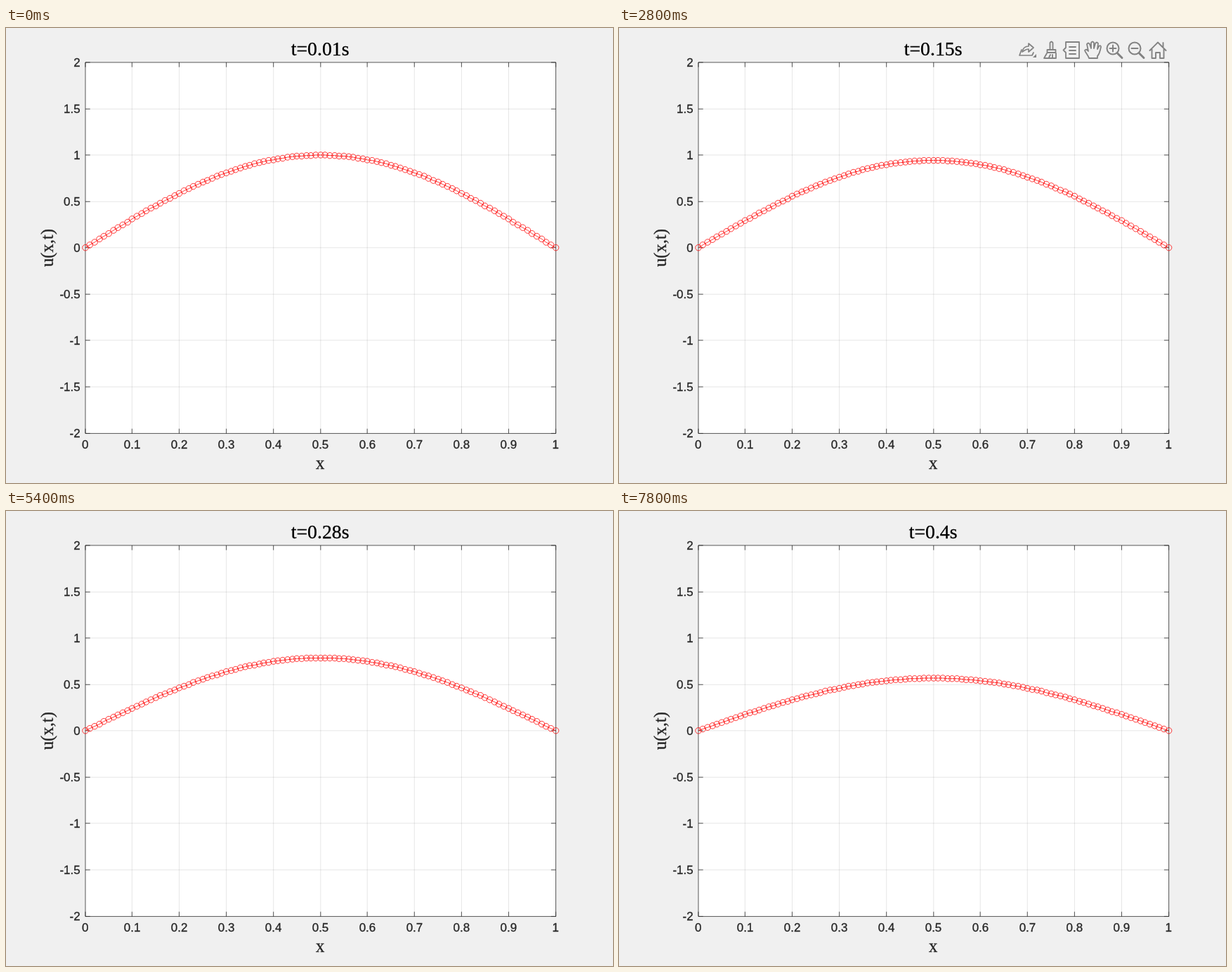
An HTML page that plays this animation: 864 by 648 pixels, repeating every 8 s.

```html
<!DOCTYPE html>
<html lang="en">
<head>
<meta charset="utf-8">
<title>Wave plot</title>
<style>
  html, body { margin: 0; width: 100%; height: 100%; overflow: hidden; background: #f0f0f0; }
  svg { display: block; }
  text { text-anchor: middle; fill: #262626; stroke: #262626; stroke-width: .4; }
  .ticks text { font: 22px "Liberation Sans", Arial, sans-serif; }
  .serif { font: 32px "Liberation Serif", Times, serif; }
  #title { font-size: 36px; fill: #000; stroke: #000; }
  .wave { fill: none; stroke: #f00; }
  #toolbar { fill: none; stroke: #828282; stroke-width: 2; stroke-linejoin: round; stroke-linecap: round; }
  #toolbar .solid { fill: #828282; stroke: none; }
</style>
</head>
<body>
<!-- The plot is laid out on a 1120 x 840 pixel grid and scaled to the stage. -->
<svg width="864" height="648" viewBox="0 0 1120 840">
  <path id="frame" fill="#fff" stroke="#262626"/>
  <path id="grid" stroke="#262626" stroke-opacity=".15"/>
  <path id="ticks" stroke="#262626"/>
  <g class="ticks" id="labels"></g>
  <text class="serif" id="title" x="579.6" y="51.2"></text>
  <text class="serif" x="579.6" y="814">x</text>
  <text class="serif" transform="translate(86.6 406) rotate(-90)">u(x,t)</text>
  <path class="wave" id="line"/>
  <path class="wave" id="markers"/>
  <g id="toolbar" transform="scale(1.2963)">
    <!-- export -->
    <path d="M573 31L570 39H588L590 35M574 34C575 28 579 26 583 26V22L590 28L583 34V30C579 30 577 32 574 34Z" stroke-width="1.7"/>
    <path class="solid" d="M594 37V42H589Z"/>
    <!-- brush -->
    <path d="M613.500 30V21Q615.500 18 617.500 21V30M609.500 31H621.500V35H609.500ZM609 36L605 43H622L622 36M612 42L614 38M617 42V38" stroke-width="1.8"/>
    <!-- data tip -->
    <path d="M636 20H655V43H636V35L632.500 31.500L636 28ZM641 27H650M641 32H650M641 37H650" stroke-width="1.8"/>
    <!-- pan -->
    <path d="M669 43C668 39 664 35 663 32Q665 29 668 33L666 23Q668 20 670 23L672 29L672 21Q674 18 676 21V29L678 22Q680 19 682 22L681 30L683 26Q686 24 686 27C685 32 684 37 681 40V43Z" stroke-width="1.8"/>
    <!-- zoom in, zoom out -->
    <path id="lens" d="M711.500 29A8.500 8.500 0 1 1 694.500 29A8.500 8.500 0 1 1 711.500 29M698.500 29H707.500"/>
    <path d="M703 24.500V33.500"/>
    <path d="M709.500 36L716 42.500M740.500 36L747 42.500" stroke-width="3"/>
    <use href="#lens" x="31"/>
    <!-- home -->
    <path d="M755.500 32L767 20.500L778.500 32M758.500 30V43H764V35H770V43H775.500V30M774.500 27V21" stroke-width="1.9"/>
  </g>
</svg>
<script>
  const LOOP = 8000, STEP = 200, DT = 0.01;
  const LEFT = 145.6, TOP = 63, WIDTH = 868, HEIGHT = 684.6;
  const OMEGA = 0.8 * Math.PI, RADIUS = 5.5, TICK = 8.7;
  const $ = id => document.getElementById(id);
  const px = x => LEFT + x * WIDTH;
  const py = u => TOP + (2 - u) * HEIGHT / 4;
  const snap = v => Math.round(v) + 0.5;

  function addLabel(x, y, value, anchor) {
    const label = document.createElementNS('http://www.w3.org/2000/svg', 'text');
    label.setAttribute('x', x);
    label.setAttribute('y', y);
    label.style.textAnchor = anchor;
    label.textContent = value;
    $('labels').append(label);
  }

  function drawAxes() {
    const left = snap(px(0)), right = snap(px(1)), top = snap(py(2)), bottom = snap(py(-2));
    let grid = '', ticks = '';
    for (let i = 0; i <= 10; i++) {
      const x = snap(px(i / 10));
      if (i % 10) grid += `M${x} ${top}V${bottom}`;
      ticks += `M${x} ${top}v${TICK}M${x} ${bottom}v${-TICK}`;
      addLabel(px(i / 10) + 0.5, 777, i / 10, 'middle');
    }
    for (let i = -4; i <= 4; i++) {
      const y = snap(py(i / 2));
      if (Math.abs(i) < 4) grid += `M${left} ${y}H${right}`;
      ticks += `M${left} ${y}h${TICK}M${right} ${y}h${-TICK}`;
      addLabel(137, py(i / 2) + 8, i / 2, 'end');
    }
    $('frame').setAttribute('d', `M${left} ${top}H${right}V${bottom}H${left}Z`);
    $('grid').setAttribute('d', grid);
    $('ticks').setAttribute('d', ticks);
  }

  function draw(ms) {
    const t = (Math.floor(ms / STEP) + 1) * DT;
    // The first two time levels are equal, so the wave lags by 1.5 steps.
    const amplitude = Math.cos(OMEGA * (t - 1.5 * DT));
    let line = '', markers = '';
    for (let i = 0; i <= 100; i++) {
      const x = snap(px(i / 100)), y = snap(py(amplitude * Math.sin(Math.PI * i / 100)));
      line += `${i ? 'L' : 'M'}${x} ${y}`;
      markers += `M${x + RADIUS} ${y}a${RADIUS} ${RADIUS} 0 1 1 ${-2 * RADIUS} 0a${RADIUS} ${RADIUS} 0 1 1 ${2 * RADIUS} 0`;
    }
    $('line').setAttribute('d', line);
    $('markers').setAttribute('d', markers);
    $('title').textContent = `t=${+t.toFixed(2)}s`;
    $('toolbar').style.display = ms >= 800 && ms < 3200 ? '' : 'none';
  }

  drawAxes();
  const start = performance.now();
  function tick() {
    draw((performance.now() - start) % LOOP);
    requestAnimationFrame(tick);
  }
  tick();
</script>
</body>
</html>
```
